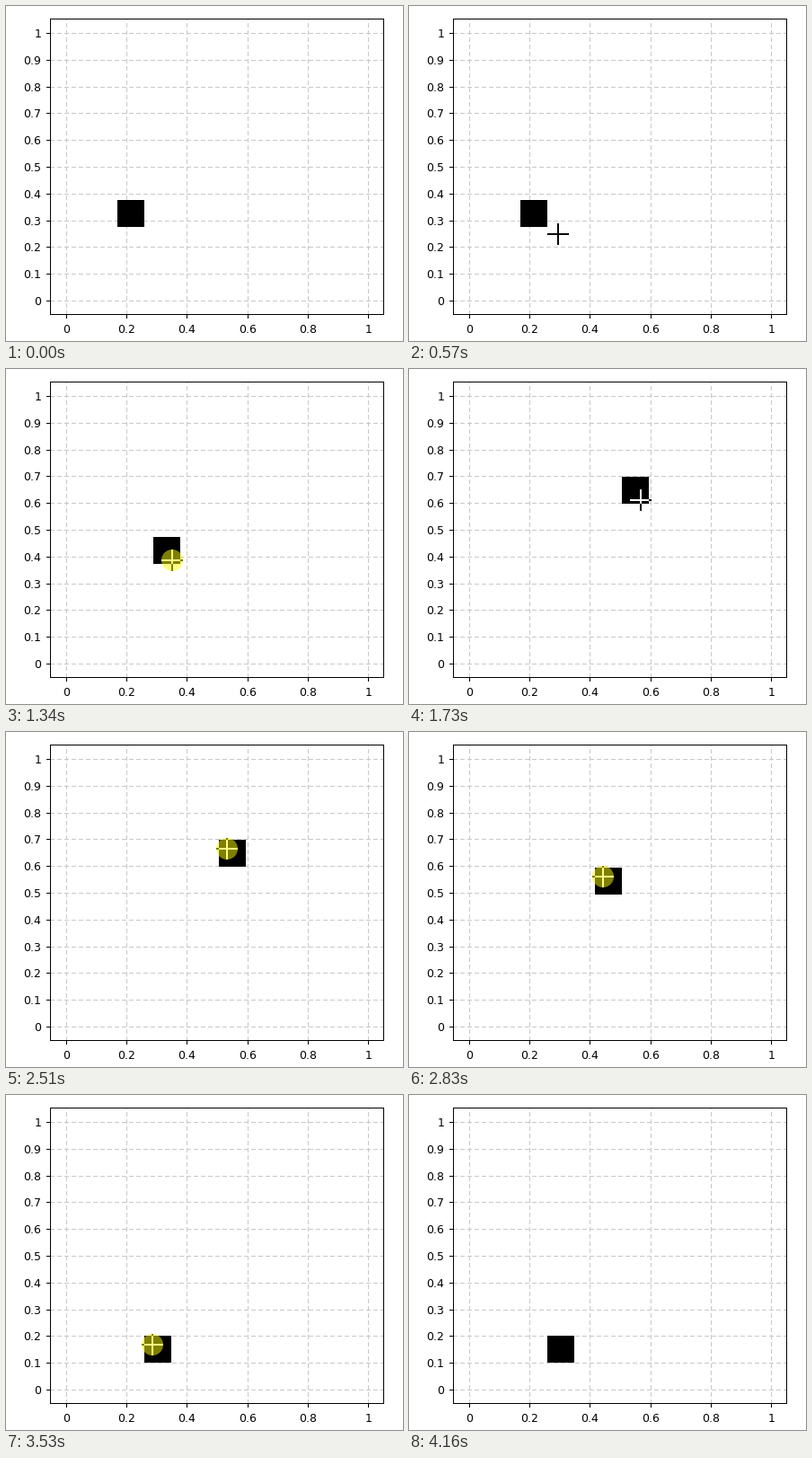
A matplotlib script for the animation above (4850 ms loop, 442 by 373 pixels).

```python
import matplotlib.pyplot as plt
from matplotlib.animation import FuncAnimation
from matplotlib.collections import LineCollection
from matplotlib.patches import Circle, Rectangle

W, H, DPI = 442, 373, 64
PX = 72 / DPI  # points per pixel
LOOP, TICK = 4850, 10
SIDE, ARM = 30, 12
LEFT, RIGHT, TOP, BOTTOM = 49, 420, 14, 343
TEXT = dict(va="baseline", size=12.5 * PX)

plt.rcParams["font.family"] = "DejaVu Sans"
fig = plt.figure(figsize=(W / DPI, H / DPI), dpi=DPI, facecolor="white")
ax = fig.add_axes([0, 0, 1, 1])
ax.set(xlim=(0, W), ylim=(H, 0))
ax.axis("off")


def add_lines(segments, color, **style):
    # Snapping moves whole coordinates to the pixel centres.
    ax.add_collection(LineCollection(segments, colors=color, linewidths=PX, **style),
                      autolim=False)


def draw_chart():
    grid, ticks = [], []
    for k in range(6):
        x = round(67 + 67.2 * k)
        grid.append([(x, BOTTOM), (x, TOP)])
        ticks.append([(x, BOTTOM), (x, BOTTOM + 4)])
        ax.text(x + 0.5, 364, f"{k / 5:g}", ha="center", **TEXT)
    for k in range(11):
        y = round(328 - 29.8 * k)
        grid.append([(LEFT, y), (RIGHT, y)])
        ticks.append([(LEFT - 4, y), (LEFT, y)])
        ax.text(39.5, y + 5, f"{k / 10:g}", ha="right", **TEXT)
    frame = [(LEFT, TOP), (RIGHT, TOP), (RIGHT, BOTTOM), (LEFT, BOTTOM), (LEFT, TOP)]
    add_lines(grid, "#c8c8c8", linestyles=[(0.5, (5, 3))], zorder=1)
    add_lines(ticks + list(zip(frame, frame[1:])), "black",
              capstyle="projecting", zorder=2)


def add_box(color, zorder):
    box = Rectangle((0, 0), 0, 0, facecolor=color, linewidth=0, zorder=zorder)
    ax.add_patch(box)
    return box


def overlap(a, b):
    x, y = max(a[0], b[0]), max(a[1], b[1])
    w = min(a[0] + a[2], b[0] + b[2]) - x
    h = min(a[1] + a[3], b[1] + b[3]) - y
    return x, y, max(w, 0), max(h, 0)


def ease(u, bias=1.0):
    u **= bias
    return u * u * (3 - 2 * u)


class Script:
    """Records the pointer, the square and the button as timed states."""

    def __init__(self):
        self.cursor, self.square, self.held = None, (124, 216), False
        self.states = []
        self.mark(0)

    def mark(self, t):
        self.states.append((t, self.cursor, self.square, self.held))

    def show(self, t, cursor):
        self.cursor = cursor
        self.mark(t)

    def press(self, t, held):
        self.held = held
        self.mark(t)

    def move(self, t0, t1, steps, end, bend=None, bias=1.0):
        start, square = self.cursor, self.square
        bend = bend or [(a + b) / 2 for a, b in zip(start, end)]
        for k in range(steps):
            u = ease((k + 1) / steps, bias)
            self.cursor = tuple(
                round(a * (1 - u) ** 2 + 2 * c * u * (1 - u) + b * u * u)
                for a, c, b in zip(start, bend, end))
            if self.held:
                self.square = tuple(s + c - a for s, c, a
                                    in zip(square, self.cursor, start))
            t = t0 + (t1 - t0) * k / max(steps - 1, 1)
            self.mark(int(t // TICK * TICK))


def build_states():
    s = Script()
    s.show(100, (293, 350))
    s.move(180, 570, 6, (166, 254), bias=0.8)
    s.move(650, 880, 4, (145, 242))
    s.press(960, True)
    s.move(1110, 1580, 7, (256, 148), bend=(207, 201), bias=1.683)
    s.move(1660, 1660, 1, (258, 146))
    s.press(1730, False)
    s.move(1900, 2360, 7, (246, 130))
    s.press(2510, True)
    s.move(2680, 3140, 7, (171, 210))
    s.move(3230, 3530, 5, (163, 278), bend=(149, 244))
    s.press(3610, False)
    s.move(3840, 4080, 4, (230, 336), bias=1.2)
    s.show(4160, None)
    return s.states


draw_chart()
states = build_states()
block = add_box("black", 3)
arms = [add_box("black", 4) for _ in range(2)]
inverted = [add_box("white", 5) for _ in range(2)]
glow = Circle((0, 0), ARM, facecolor="#ffff00", alpha=0.5, linewidth=0, zorder=6)
ax.add_patch(glow)


def update(i):
    t = i * TICK
    _, cursor, square, held = [s for s in states if s[0] <= t][-1]
    area = (*square, SIDE, SIDE)
    block.set_bounds(area)
    glow.set_visible(held)
    for part in arms + inverted:
        part.set_visible(cursor is not None)
    if cursor:
        x, y = cursor
        glow.center = cursor
        bars = (x - ARM, y - 1, 2 * ARM, 2), (x - 1, y - ARM, 2, 2 * ARM)
        for bar, arm, flip in zip(bars, arms, inverted):
            arm.set_bounds(bar)
            flip.set_bounds(overlap(bar, area))
    return [block, *arms, *inverted, glow]


anim = FuncAnimation(fig, update, frames=LOOP // TICK, interval=TICK,
                     repeat=True, repeat_delay=0)
plt.show()
```
